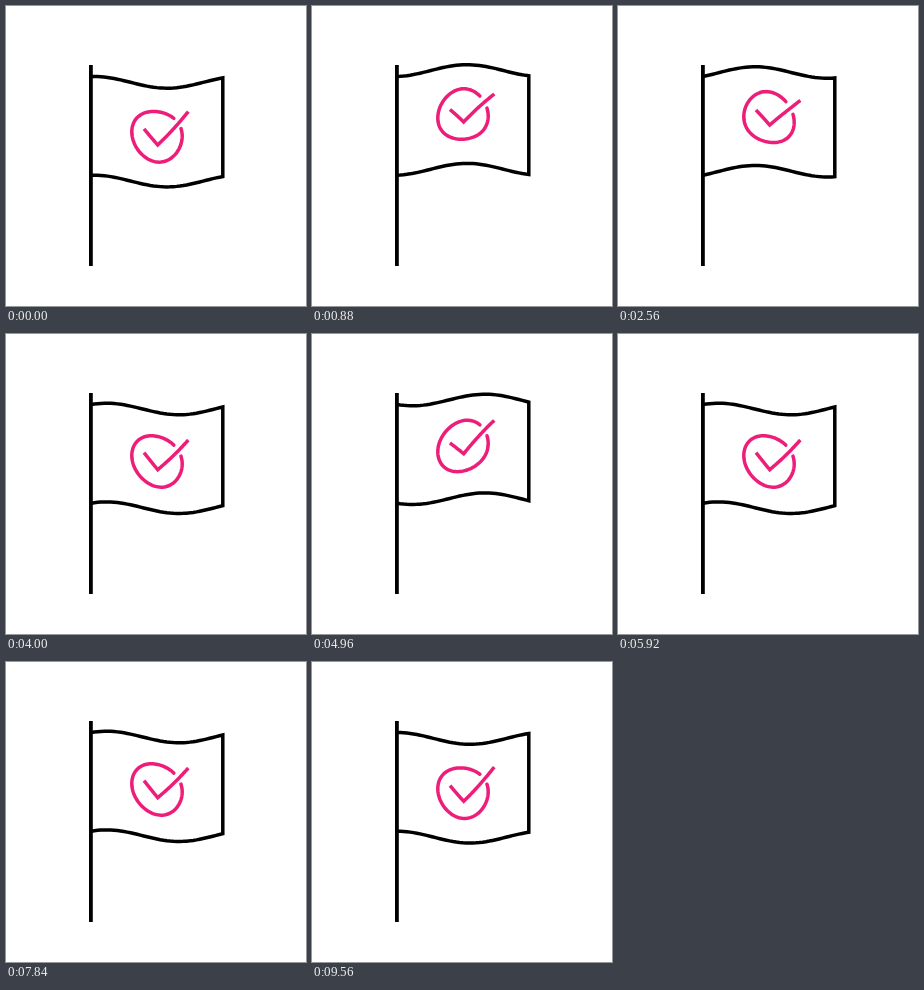
These frames come from a looping animation (300x300 px, 9600 ms). An HTML page with a canvas:

```html
<!DOCTYPE html>
<html>
<head>
<meta charset="utf-8">
<style>
  html, body { margin: 0; width: 100%; height: 100%; overflow: hidden; background: #fff; }
  canvas { display: block; }
</style>
</head>
<body>
<canvas id="stage" width="300" height="300"></canvas>
<script>
const ctx = document.getElementById('stage').getContext('2d');
const LEFT = 85, RIGHT = 216.8, TOP = 70.5, BOTTOM = 169.2;
const PERIOD = 1920, STEP = 40, AMPLITUDE = 11.8, WAVELENGTH = 300;
const PINK = '#ed1e79';

// Travelling wave, pinned at the pole and nearly still at the free edge.
function lift(x, time) {
  const envelope = Math.sin(Math.PI * (x - LEFT) / 143);
  const phase = 2 * Math.PI * ((x - 166) / WAVELENGTH - time / PERIOD);
  return AMPLITUDE * envelope * Math.cos(phase);
}

function line(from, to, n = 40) {
  return Array.from({ length: n + 1 }, (_, i) =>
    from.map((a, k) => a + (to[k] - a) * i / n));
}

function arc(cx, cy, r, start, end, n = 90) {
  return Array.from({ length: n + 1 }, (_, i) => {
    const a = (start + (end - start) * i / n) * Math.PI / 180;
    return [cx + r * Math.cos(a), cy + r * Math.sin(a)];
  });
}

const cloth = [
  ...line([LEFT, TOP], [RIGHT, TOP]),
  ...line([RIGHT, BOTTOM], [LEFT, BOTTOM])
];
const ring = arc(151, 119.7, 25.2, -18, 312);
const tick = [
  ...line([138, 113.8], [151.7, 127.7]),
  ...line([151.7, 127.7], [182.3, 96.2])
];

function stroke(points, time, color, cap = 'butt') {
  ctx.strokeStyle = color;
  ctx.lineCap = cap;
  ctx.beginPath();
  for (const [x, y] of points) ctx.lineTo(x, y + lift(x, time));
  ctx.stroke();
}

function draw(now) {
  const time = Math.floor(now / STEP) * STEP % PERIOD;
  ctx.fillStyle = '#fff';
  ctx.fillRect(0, 0, 300, 300);
  ctx.lineWidth = 3.5;
  stroke(cloth, time, '#000');
  stroke(ring, time, PINK, 'round');
  stroke(tick, time, PINK);
  ctx.fillStyle = '#000';
  ctx.fillRect(83, 59, 3.8, 201);
}

const begin = performance.now();
function loop() {
  draw(performance.now() - begin);
  requestAnimationFrame(loop);
}
loop();
</script>
</body>
</html>
```
